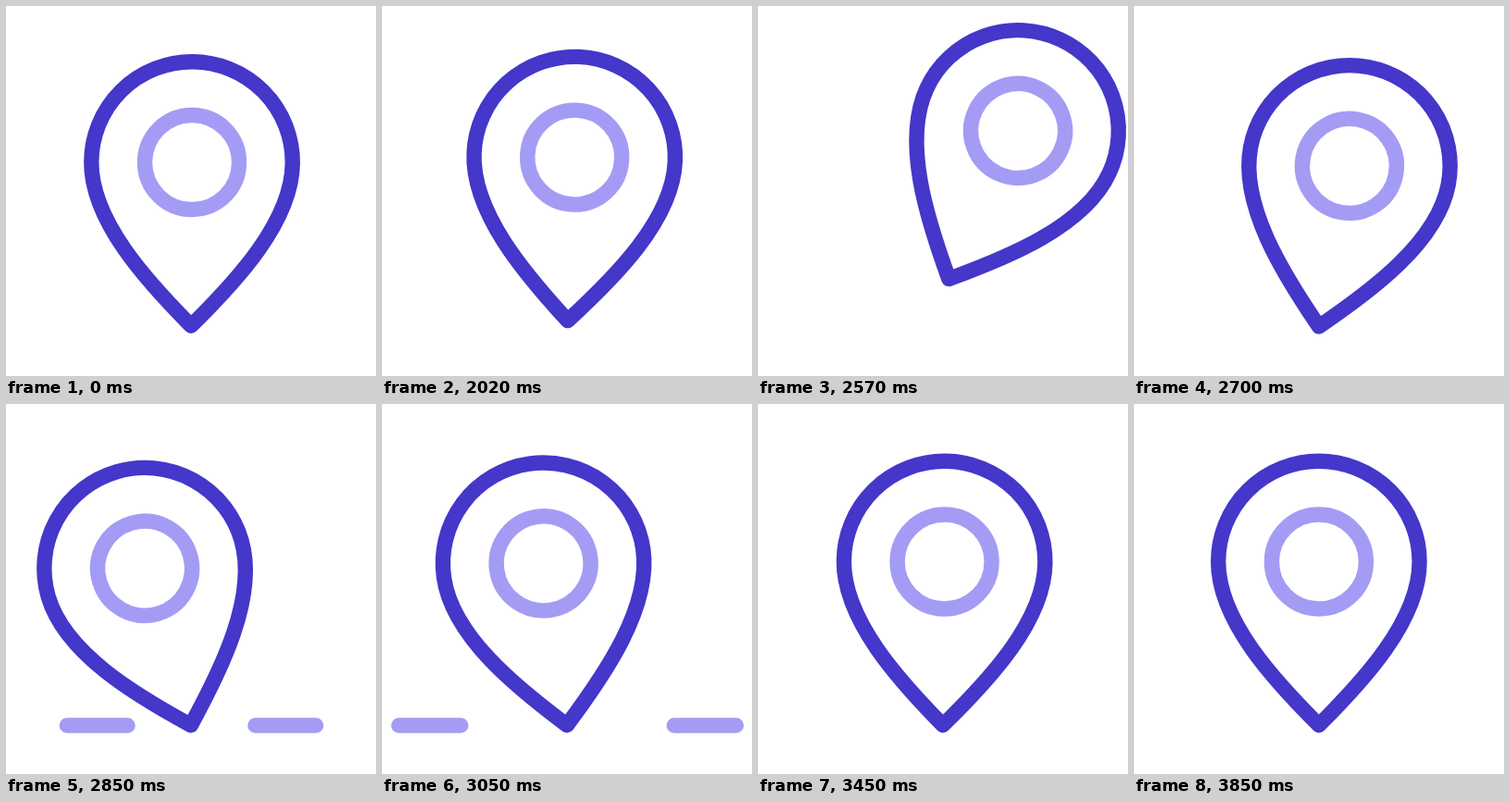
These frames come from a looping animation (400x400 px, 3.87 s). An HTML page:

```html
<!DOCTYPE html>
<html lang="en">
<head>
<meta charset="utf-8">
<title>Bouncing map pin</title>
<style>
  html, body { margin: 0; width: 100%; height: 100%; overflow: hidden; background: #fff; }
  svg { display: block; width: 100%; height: 100%; }
  path, circle { fill: none; stroke-width: 16.4; stroke-linecap: round; stroke-linejoin: round; }
  .dark { stroke: #4437c9; }
  .light { stroke: #a49cf4; }
</style>
</head>
<body>
<svg viewBox="0 0 400 400">
  <path id="dashes" class="light"/>
  <!-- the pin's tip is its local origin -->
  <g id="pin">
    <path class="dark" d="M0 0C-48-48-108.75-113-108.75-176.75A108.75 108.75 0 0 1 108.75-176.75C108.75-113 48-48 0 0Z"/>
    <circle class="light" cy="-176.75" r="51"/>
  </g>
</svg>
<script>
const LOOP = 3870, REST_END = 2020, STEP = 25;
const pin = document.getElementById('pin');
const dashes = document.getElementById('dashes');

// Cubic easing with flat ends; a and b are the handles' time positions.
const ease = (a, b) => u => {
  if (u <= 0) return 0;
  if (u >= 1) return 1;
  let lo = 0, hi = 1, s;
  for (let i = 0; i < 24; i++) {
    s = (lo + hi) / 2;
    const x = 3 * a * s * (1 - s) ** 2 + 3 * b * s * s * (1 - s) + s ** 3;
    if (x < u) lo = s; else hi = s;
  }
  return s * s * (3 - 2 * s);
};
const smooth = ease(1 / 3, 2 / 3);
const launch = ease(0.167, 0.1);
const rise = ease(0.167, 0.24);
const lead = ease(0.167, 0.2);
const trail = ease(0.85, 0.8);

// Keys are [time, value, easing towards this key].
function track(keys, t) {
  let [t0, v0] = keys[0];
  for (const [t1, v1, fn = smooth] of keys) {
    if (t < t1) return t <= t0 ? v0 : v0 + (v1 - v0) * fn((t - t0) / (t1 - t0));
    t0 = t1;
    v0 = v1;
  }
  return v0;
}

const jump = [[1973, 0], [2515, 1, rise], [2712, 0]];
const tilt = [[1978, 0], [2575, 25, launch], [2908, -20], [3240, 10], [3570, -3.5], [3860, 0]];
const DASH_START = 2700, DASH_TIME = 500;

function draw(t) {
  const lift = track(jump, t);
  const angle = track(tilt, t);
  pin.setAttribute('transform',
    `translate(${199.9 + 8.3 * lift} ${347.25 - 67 * lift}) rotate(${angle})`);

  const u = (t - DASH_START) / DASH_TIME;
  let d = '';
  if (u > 0 && u < 1) {
    const inner = 62.5 + 127 * trail(u), outer = 62.5 + 127 * lead(u);
    for (const side of [-1, 1])
      d += `M${200.5 + side * inner} 347.5H${200.5 + side * outer}`;
  }
  dashes.setAttribute('d', d);
}

const start = performance.now();
function tick() {
  const t = (performance.now() - start) % LOOP;
  // The resting pose is held just after take-off, then motion runs in even steps.
  draw(t < REST_END ? 1996 : Math.floor((t + 5) / STEP) * STEP);
  requestAnimationFrame(tick);
}
tick();
</script>
</body>
</html>
```
